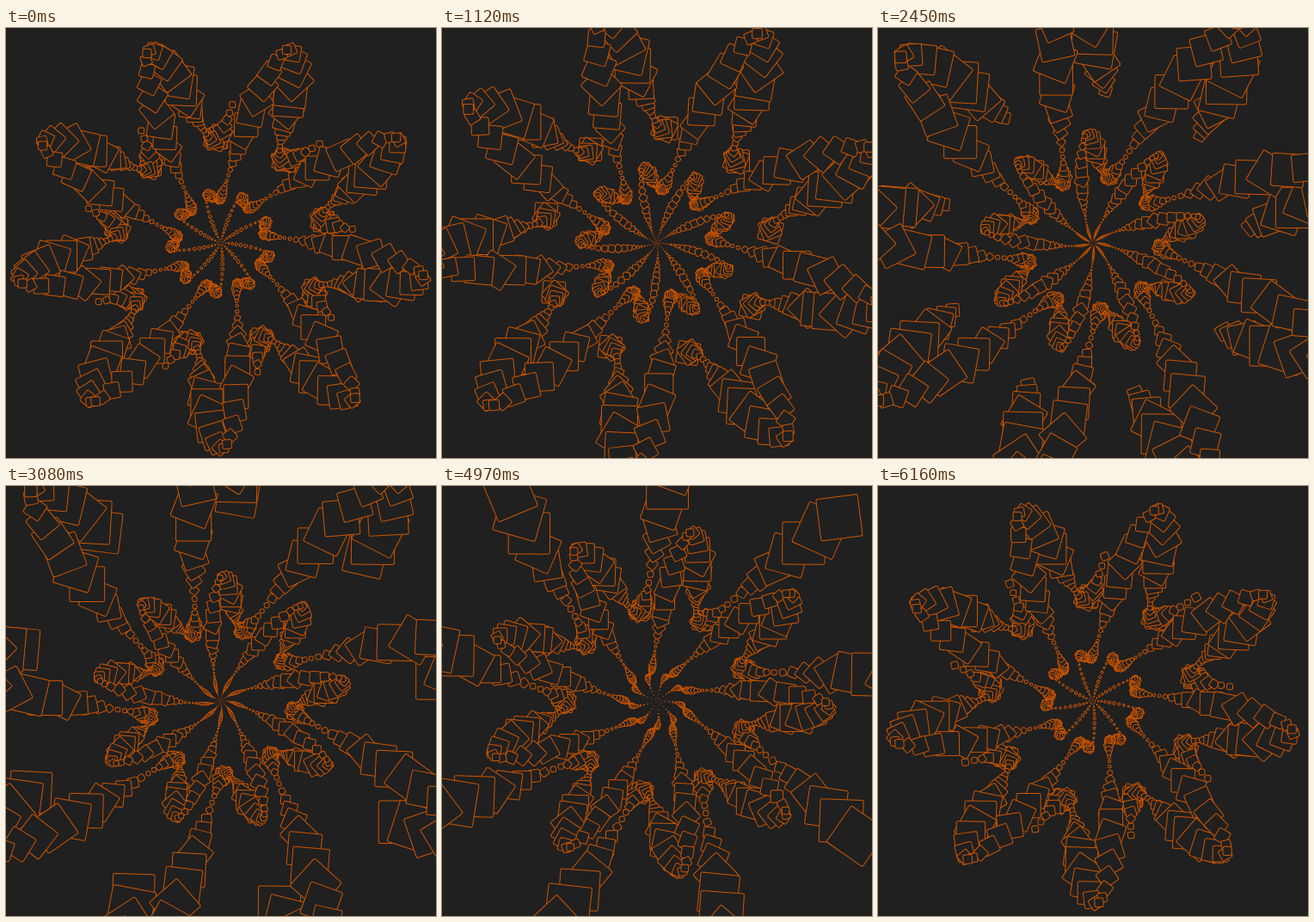
These frames come from a looping animation (500x500 px, 6.23 s). An HTML page with a canvas:

```html
<!DOCTYPE html>
<html lang="en">
<head>
<meta charset="utf-8">
<title>Pulsing spiral of squares</title>
<style>
  html, body { margin: 0; width: 100%; height: 100%; overflow: hidden; background: #202020; }
  canvas { display: block; width: 500px; height: 500px; }
</style>
</head>
<body>
<canvas id="stage" width="500" height="500"></canvas>
<script>
  const ctx = document.getElementById('stage').getContext('2d');
  const COUNT = 700;
  const TURN = 0.7;              // radians between neighbouring squares
  const SPREAD = 0.28;           // flat distance from the centre per square
  const WAVE = Math.PI / 180;    // wave phase per square
  const LAG = 0.09;
  const CAMERA = 433;            // eye distance in front of the plane
  const DEPTH = 200;             // how far the wave lifts a square
  const STEP = 70;               // ms per picture
  const STEPS = 89;
  const CORNER = 2;

  function makeSquare(i, time) {
    const phase = i * WAVE - time - LAG;
    const ripple = Math.sin(3 * phase);
    const z = DEPTH * Math.sin(phase);
    const radius = SPREAD * i * CAMERA / (CAMERA - z);
    return {
      z,
      x: 250 + radius * Math.cos(i * TURN),
      y: 250 + radius * Math.sin(i * TURN),
      size: radius * (0.12 + 0.077 * ripple),
      spin: -Math.PI * ripple
    };
  }

  function drawSquare({ x, y, size, spin }) {
    const cos = Math.cos(spin), sin = Math.sin(spin);
    ctx.setTransform(cos, sin, -sin, cos, x, y);
    ctx.beginPath();
    ctx.roundRect(-size / 2, -size / 2, size, size, Math.min(CORNER, size / 2));
    ctx.fill();
    ctx.stroke();
  }

  function draw(step) {
    ctx.setTransform(1, 0, 0, 1, 0, 0);
    ctx.fillStyle = '#202020';
    ctx.strokeStyle = '#cc5500';
    ctx.lineWidth = 1;
    ctx.fillRect(0, 0, 500, 500);

    const time = step * STEP / 1000;
    const squares = Array.from({ length: COUNT }, (_, i) => makeSquare(i, time));
    // Nearer squares cover those behind them.
    squares.sort((a, b) => a.z - b.z).forEach(drawSquare);
  }

  const start = performance.now();
  let shown = 0;

  function tick() {
    const step = Math.floor((performance.now() - start) / STEP) % STEPS;
    if (step !== shown) draw(shown = step);
    requestAnimationFrame(tick);
  }

  draw(0);
  requestAnimationFrame(tick);
</script>
</body>
</html>
```
